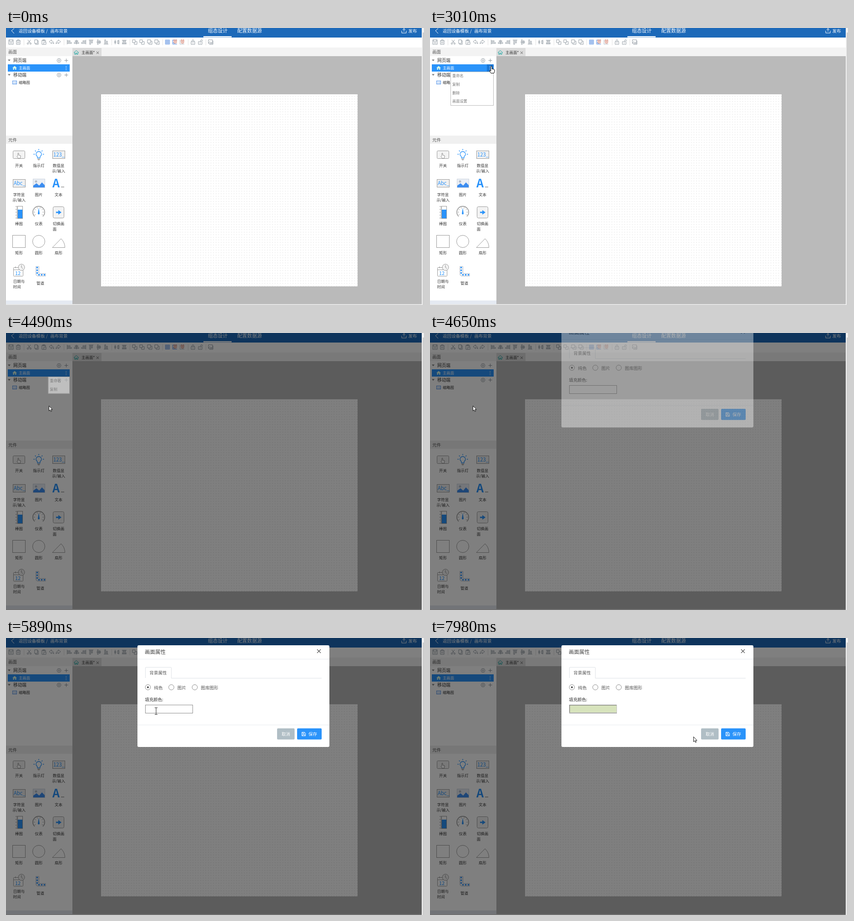
Animation, 919 px wide and 610 px high, one loop 8000 ms. Source, as an HTML page:

```html
<!DOCTYPE html>
<html lang="zh-CN">
<head>
<meta charset="utf-8">
<style>
html, body { margin: 0; width: 100%; height: 100%; overflow: hidden; background: #fff; }
svg { display: block; font-family: "Noto Sans CJK SC", "Noto Sans CJK", "Noto Sans CJK JP", sans-serif; }
</style>
</head>
<body>
<svg id="stage" width="919" height="610" viewBox="0 0 919 610"></svg>
<script>
const BLUE = '#2a93fa', GRAY = '#8a929b', TEXT = '#333';
const rect = (x, y, w, h, fill, extra = '') =>
  `<rect x="${x}" y="${y}" width="${w}" height="${h}" fill="${fill}" ${extra}/>`;
const box = (x, y, w, h, stroke, fill = 'none', r = 0) =>
  rect(x + .5, y + .5, w - 1, h - 1, fill, `stroke="${stroke}" rx="${r}"`);
const text = (x, y, size, str, fill = TEXT, extra = '') =>
  `<text x="${x}" y="${y + size * .37}" font-size="${size}" fill="${fill}" ${extra}>${str}</text>`;
const mid = (x, y, str) => text(x, y, 8.46, str, TEXT, 'text-anchor="middle"');
const path = (d, stroke = GRAY, fill = 'none', x = 0, y = 0, w = 1) =>
  `<path d="${d}" stroke="${stroke}" fill="${fill}" stroke-width="${w}" transform="translate(${x} ${y})"/>`;
const circle = (x, y, r, stroke, fill = 'none') =>
  `<circle cx="${x}" cy="${y}" r="${r}" stroke="${stroke}" fill="${fill}"/>`;
const group = (id, body, extra = '') => `<g id="${id}" ${extra}>${body}</g>`;

const HOME = 'M-5 0L0-4.5L5 0H3.5V4H1V1H-1V4H-3.5V0z';
const CROSS = 'M-2.5-2.5L2.5 2.5M2.5-2.5L-2.5 2.5';

function header() {
  return rect(0, 0, 914, 21, '#1c69b9') +
    path('M4-5L-2 0L4 6', '#fff', 'none', 14, 6) +
    text(28, 6, 9.6, '返回设备模板', '#fff', 'font-weight="500"') + text(88, 6, 9.6, '/', '#fff') +
    text(97.5, 6, 9.5, '画布背景', '#fff', 'font-weight="500"') +
    text(444, 6, 10.8, '组态设计', '#fff') + text(508.5, 6, 10.8, '配置数据源', '#fff') +
    rect(434, 18, 62, 2.5, '#fff') +
    path('M-5 0V5H5V0M0 2V-5M-3-2L0-5L3-2', '#fff', 'none', 875, 6) + text(884.5, 6, 9.6, '发布', '#fff');
}

function toolbar() {
  const ring = x => `M${x} 3.3a1.6 1.6 0 1 0 3.2 0a1.6 1.6 0 1 0-3.2 0`;
  const layers = 'M-5-5H1V1H-5zM-1 1V5H5V-1H1', stack = 'M-5-5H2V2H-5zM-2 2V5H5V-2H2';
  const magnet = 'M-2-4V1a3 3 0 0 0 6 0V-4H2V1a1 1 0 0 1-2 0V-4z';
  const lock = 'M-4-1H4V5H-4zM0 1V3';
  const icons = [
    [11, 'M-5-5H5V5H-5zM-3-5V-1H3V-5M-3 2H3'],
    [27, 'M-5-3H5M-2-3V-5H2V-3M-4-3V5H4V-3M-1.3-1V3M1.3-1V3'],
    [51, 'M-3-5L2 2M3-5L-2 2' + ring(-4.6) + ring(1.4)],
    [67, 'M-4-5H2V3H-4zM2-3H4V5H-2V3'],
    [83, 'M-4-4H4V0M0 5H-4V-4M-2-5H2V-3H-2zM0 0H5V5H0z'],
    [100, 'M-5-1L0-5V-2.5Q5-2 5 4Q3 1 0 1V3.5z'],
    [115, 'M5-1L0-5V-2.5Q-5-2-5 4Q-3 1 0 1V3.5z'],
    [139, 'M-4.5-5V5M-3-3H2V-1H-3zM-3 1H5V3H-3z'],
    [155, 'M0-5V5M-3-3H3V-1H-3zM-5 1H5V3H-5z'],
    [171, 'M4.5-5V5M-2-3H3V-1H-2zM-5 1H3V3H-5z'],
    [187, 'M-5-4.5H5M-3-3V5H-1V-3zM1-3V2H3V-3z'],
    [204, 'M-5 0H5M-3-5V5H-1V-5zM1-3V3H3V-3z'],
    [220, 'M-5 4.5H5M-3-5V3H-1V-5zM1-2V3H3V-2z'],
    [244, 'M-4-5V5M4-5V5M-5-2H-3V2H-5zM1-3H4V3H1z'],
    [260, 'M-5-4H5M-5 4H5M-3-3H3V-1H-3zM-4 1H4V3H-4z'],
    [283, layers], [299, layers], [316, stack], [332, stack],
    [411, lock + 'M-2-1V-3a2 2 0 0 1 4 0V-1'],
    [427, lock + 'M1-1V-3a2 2 0 0 1 4 0V-2'],
    [450, 'M-5-5H4V3H-5zM-5 2L-2-1L1 2L3 0M5-3V5H-3']
  ];
  const grid = 'M-4.5-5V5M-1.5-5V5M1.5-5V5M4.5-5V5M-5-4.5H5M-5-1.5H5M-5 1.5H5M-5 4.5H5';
  return icons.map(([x, d]) => path(d, GRAY, 'none', x, 31, .9)).join('') +
    [39, 127, 232, 272, 344, 400, 439].map(x => rect(x, 25, 1, 13, '#e2e2e2')).join('') +
    path(grid, '#5b8fe0', 'none', 355, 31) +
    path('M-4.5-5V5M-1.5-5V5M-5-4.5H5M-5 4.5H5M-5 1.5H0', '#5b8fe0', 'none', 371, 31) +
    path(magnet, '#d0705c', '#fff', 371, 30, .9) +
    path('M-4.5-5V5M-5 4.5H5', '#b5bcc6', 'none', 387, 31) + path(magnet, '#d0705c', 'none', 387, 30, .9);
}

function tree() {
  const section = (y, name) => path('M-3-1.5H3L0 2z', 'none', '#777', 7, y) + text(16, y, 9.7, name) +
    path('M-2.3-4H2.3L4.6 0L2.3 4H-2.3L-4.6 0z', GRAY, 'none', 116.5, y + .5, .9) +
    circle(116.5, y + .5, 1.6, GRAY) + path('M-4 0H4M0-4V4', GRAY, 'none', 132.5, y + .5);
  return rect(0, 43, 146, 19, '#f3f3f3') + text(5, 52.5, 9.6, '画面', '#555') +
    section(71, '网页端') + section(103, '移动端') +
    rect(4, 80, 136, 16, BLUE) + rect(125, 80, 15, 16, '#1a78d8', 'id="more"') +
    path(HOME, 'none', '#d6f7e8', 19, 88) + text(28, 88, 8.4, '主画面', '#fff') +
    [84, 87.5, 91].map(y => rect(131.5, y, 1.4, 1.4, '#fff')).join('') +
    box(14, 116, 10, 8, '#4a8ee8') + path('M16.5 119H18.5M16.5 121.5H18.5M20 119H22M20 121.5H22', '#4a8ee8') +
    text(28, 120, 8.3, '缩略图');
}

function palette() {
  const label = (x, y, ...lines) => lines.map((s, i) => mid(x, y + i * 11.5, s)).join('');
  const polar = (cx, cy, r0, r1, a) => {
    const c = Math.cos(a), s = Math.sin(a);
    return `M${cx + r0 * c} ${cy + r0 * s}L${cx + r1 * c} ${cy + r1 * s}`;
  };
  const ticks = (cx, cy, r0, r1, from, step, n) =>
    Array.from({ length: n }, (_, i) => polar(cx, cy, r0, r1, from + i * step)).join('');
  const field = (x, y, s) => box(x, y, 28, 18, '#999', '#f0f0f0') + text(x + 2, y + 9, 11.3, s, BLUE);
  const ruler = Array.from({ length: 9 }, (_, i) => `M${i % 2 ? 23 : 21} ${393 + i * 3.2}H25`).join('');
  const pipe = [526, 532, 538].map(y => rect(67, y, 3, 3, BLUE)).join('') +
    [71, 77, 83].map(x => rect(x, 542, 3, 3, BLUE)).join('');
  return rect(0, 237, 146, 18, '#f0f0f0') + text(5, 246, 9.6, '元件', '#555') +
    box(15, 270, 27, 18, '#999', '#f3f3f3', 2) +
    path('M26 281V276q1-1.5 2 0V280L32 281V284L31 287H27L24 283z', '#777', '#fff', 0, 0, .8) +
    label(28.5, 303, '开关') +
    path('M69 286V283Q66 281 66 278a6 6 0 0 1 12 0Q78 281 75 283V286z', BLUE, '#fff', 0, 0, 1.3) +
    path('M69 288.500H75M70 290.500H74', '#777') +
    path(ticks(72, 278, 9, 11.5, -Math.PI, Math.PI / 4, 5), BLUE, 'none', 0, 0, 1.4) + label(72, 303, '指示灯') +
    field(102, 270, '123_') + label(115.5, 303, '数值显', '示/输入') +
    field(15, 333, 'Abc_') + label(28.5, 367, '字符显', '示/输入') +
    box(59, 332, 27, 20, '#ccd3dd', '#e9eef5') + circle(66, 338, 2.5, 'none', '#b5bcc6') +
    path('M60 351V347L67 342L73 347L79 340L85 346V351z', 'none', '#3c8df0') + label(72, 367, '图片') +
    text(102, 342, 25, 'A', BLUE, 'font-weight="700"') + rect(121, 349.5, 7, 1.3, '#888') + label(115.5, 367, '文本') +
    path(ruler + 'M25.5 392V419', '#888') + box(25, 392, 12, 28, '#999') + rect(26, 400, 10, 19, BLUE) +
    label(28.5, 431, '棒图') +
    path('M63 415a13 13 0 1 1 18 0', '#999', 'none', 0, 0, 1.6) +
    path(ticks(72, 405.5, 8.5, 11, -Math.PI * 1.2, Math.PI * .2, 8), '#999') +
    path('M72 396L74 409Q72 412 70 409z', 'none', BLUE) + label(72, 431, '仪表') +
    box(103, 393, 25, 26, '#999', '#f3f3f3', 3) + path('M110 404.500H115V401L122 406L115 411V407.500H110z', 'none', BLUE) +
    label(115.5, 431, '切换画', '面&#12288;&#12288;') +
    box(14, 456, 29, 28, '#999') + label(28.5, 495, '矩形') +
    circle(72, 470, 13.5, '#999') + label(72, 495, '圆形') +
    path('M102 483.500L121 464Q129.500 472 129.500 483.500z', '#999') + label(115.5, 495, '扇形') +
    box(16, 527, 22, 20, '#999', '#fff', 1) + path('M16 532.500H38M21 525V529', '#999') +
    text(20, 540, 11, '12', BLUE) + circle(34, 527, 7, '#999', '#f3f3f3') + path('M34 522.500V527L37 530', '#888') +
    label(28.5, 558, '日期与', '时间&#12288;') +
    path('M65.500 525V541Q65.500 546.500 71 546.500H87V540.500H74Q72.500 540.500 72.500 538V525z', '#b9c4d2', '#e9eef5') +
    pipe + label(75.5, 562, '管道') +
    rect(0, 600, 146, 9, '#e5eaf2');
}

function workspace() {
  return rect(146, 43, 768, 19, '#f3f3f3') + rect(146, 44, 64, 18, '#dcdcdc') +
    path(HOME, '#17a5a0', 'none', 154.5, 54) + text(166, 54, 8.46, '主画面*') + path(CROSS, '#555', 'none', 201.5, 54.5) +
    rect(146, 62, 768, 546, '#bababa') + rect(209, 146, 564, 423, '#fff') + rect(209, 146, 564, 423, 'url(#dots)') +
    rect(0, 608, 914, 2, '#e6e6e6');
}

function menu() {
  const items = ['重命名', '复制', '删除', '画面设置'];
  return `<svg id="menu" y="96" overflow="hidden">` + rect(0, 0, 95, 75, '#fff') +
    rect(0, 0, 95, 19, '#dbe8fb', 'id="hover"') +
    items.map((s, i) => text(4, 9 + i * 18.8, 8.2, s, '#777')).join('') +
    `<rect id="frame" x=".5" y=".5" fill="none" stroke="#bbb"/></svg>`;
}

function modal() {
  const radio = (x, s) => circle(x, 108.5, 5.8, '#888', '#fff') + text(x + 13.3, 109, 9.6, s, '#555');
  return rect(289, 16, 422, 224, '#fff', 'rx="3"') +
    text(305, 31, 11.5, '画面属性', '#444') + path('M-4-4L4 4M4-4L-4 4', '#555', 'none', 688, 29, 1.2) +
    rect(289, 46, 422, 1, '#e9ecef') +
    path('M306.500 88V66Q306.500 64.500 308 64.500H362Q363.500 64.500 363.500 66V88.500H694', '#dee2e6') +
    text(315.5, 76, 9.5, '背景属性', '#555') +
    radio(312, '纯色') + circle(312, 108.5, 2, 'none', '#444') + radio(363.5, '图片') + radio(415, '图库图形') +
    text(305.5, 136, 9.4, '填充颜色:') + box(306, 147, 105, 19, '#8c8c8c', '#fff') +
    group('filled', rect(306, 147, 105, 18, '#d7e3bc') + path('M306.800 165V147.800H411', '#858585', 'none', 0, 0, 1.5) +
      path('M306 164.500H410.500V147', '#c4c4c4')) +
    rect(289, 191, 422, 1, '#e9ecef') +
    rect(596, 199, 38.5, 24.5, '#b0bec5', 'rx="2"') + text(606, 211.5, 9.3, '取消', '#fff') +
    rect(640, 199, 54, 24.5, BLUE, 'rx="2"') +
    path('M-4-4H2L4-2V4H-4zM-2-4V-1H1V-4M-2 4V1H2V4', '#fff', 'none', 654.5, 211.5) +
    text(665, 211.5, 9.5, '保存', '#fff', 'font-weight="500"');
}

function picker() {
  const theme = 'fff 000 eeece1 1f497d 4f81bd c0504d 9bbb59 8064a2 4bacc6 f79646';
  const tints = [
    'f2f2f2 7f7f7f ddd9c3 c6d9f0 dbe5f1 f2dcdb ebf1dd e5e0ec dbeef3 fdeada',
    'd8d8d8 595959 c4bd97 8db3e2 b8cce4 e5b9b7 d7e3bc ccc1d9 b7dde8 fbd5b5',
    'bfbfbf 3f3f3f 938953 548dd4 95b3d7 d99694 c3d69b b2a2c7 92cddc fac08f',
    'a5a5a5 262626 494429 17365d 366092 953734 76923c 5f497a 31859b e36c09',
    '7f7f7f 0c0c0c 1d1b10 0f243e 244061 632423 4f6128 3f3151 205867 974806'];
  const standard = 'c00000 f00 ffc000 ff0 92d050 00b050 00b0f0 0070c0 002060 7030a0';
  const row = (colors, y, h, border) => colors.split(' ').map((c, i) => {
    const x = 311 + i * 13.38;
    return rect(x, y, 11, h, '#' + c) + (border ? rect(x + .5, y + .5, 10, h - 1, 'none', 'stroke="#bbb" stroke-opacity=".7"') : '');
  }).join('');
  return box(306, 166, 141, 138, '#aaa', '#fff', 1) + text(313, 179, 9.3, '主题色') + row(theme, 189, 11, true) +
    tints.map((c, i) => row(c, 207 + i * 9.4, 9.5)).join('') +
    text(313, 265.5, 9.3, '标准色') + row(standard, 275.5, 11, true) +
    text(311, 295, 8.3, 'Web安全色', '#4a50e0') + text(355.5, 295, 8.3, '历史', '#4a50e0');
}

const cursors =
  group('arrow', path('M.5.500V11.500L3 9.200L4.800 13L6.500 12.200L4.800 8.600H8z', '#000', '#fff', 0, 0, .9)) +
  group('hand', path('M-1.300 9V1.200a1.300 1.300 0 0 1 2.600 0V6L5.500 7Q7 7.400 7 9V11.500L5.500 15.500H-1L-4 11Q-4.300 8.500-2.600 9.300L-1.300 11z', '#000', '#fff')) +
  group('beam', path('M-3-7.500H-.5L0-7L.5-7.500H3M0-7V7M-3 7.500H-.5L0 7L.5 7.500H3', '#222'));

const stage = document.getElementById('stage');
stage.innerHTML =
  `<defs><pattern id="dots" x="209" y="146" width="5.64" height="5.64" patternUnits="userSpaceOnUse">
    ${rect(4.2, 4.2, 1, 1, '#bdbdbd')}</pattern></defs>` +
  rect(0, 0, 919, 610, '#fff') + header() + toolbar() + tree() + palette() + workspace() +
  rect(914, 0, 5, 610, '#f1f1f1') + rect(916, 10, 3, 600, '#cfcfcf') +
  rect(0, 0, 914, 610, '#000', 'id="shade" opacity=".5"') + menu() +
  group('modal', modal()) + group('picker', picker()) + group('cursor', cursors);

const el = id => document.getElementById(id);
const show = (id, on) => el(id).setAttribute('display', on ? 'inline' : 'none');
const set = (id, attrs) => { for (const k in attrs) el(id).setAttribute(k, attrs[k]); };
const clamp = v => Math.max(0, Math.min(1, v));

// start, end, steps, target x, target y
const moves = [
  [430, 1210, 11, 454, 242], [1920, 2630, 10, 135, 84], [3470, 4170, 10, 94, 160],
  [5120, 5660, 8, 330, 175], [5737, 5890, 3, 330, 161],
  [6420, 6890, 7, 391, 207], [6960, 7130, 3, 397, 223], [7430, 7980, 8, 579, 217]
];
const stepped = (t, t0, t1, n) => clamp((Math.floor((t - t0) / (t1 - t0) * (n - 1) + .05) + 1) / n);

function pointer(t) {
  let x = 848, y = 585;
  for (const [t0, t1, n, tx, ty] of moves) {
    if (t < t0) break;
    const e = (1 - Math.cos(Math.PI * stepped(t, t0, t1, n))) / 2;
    x += (tx - x) * e;
    y += (ty - y) * e;
  }
  return [x, y];
}

function draw(t) {
  const [x, y] = pointer(t), dimmed = t >= 4490;
  const picking = t >= 6040 && t < 7430;
  const beam = dimmed && x > 306 && x < 411 && y > 147 && y < 166;
  const hand = !dimmed && x < 140 && y > 80 && y < 172;
  show('cursor', t >= 430);
  set('cursor', { transform: `translate(${x} ${y})` });
  show('hand', hand);
  show('beam', beam);
  show('arrow', !hand && !beam);
  show('more', hand && x > 125 && y < 96);

  const open = t < 2870 || t >= 4572 ? 0 : dimmed ? .5 : stepped(t, 2870, 3010, 3);
  const w = 95 * open, h = 75 * open;
  show('menu', open > 0);
  set('menu', { x: 140 - w, width: w, height: h, opacity: open });
  set('frame', { width: Math.max(0, w - 1), height: Math.max(0, h - 1) });
  show('hover', hand && y >= 96);
  set('hover', { y: Math.min(3, Math.floor((y - 96) / 18.8)) * 18.8 });

  const p = clamp(Math.floor((t - 4490) / 82 + .02) / 5);
  show('shade', dimmed);
  show('modal', p > 0);
  set('modal', { opacity: Math.min(1, p * 2), transform: `translate(0 ${-50 * (1 - p) ** 2})` });
  show('filled', t >= 7430);
  show('picker', picking);
}

const begin = performance.now();
function tick() {
  draw((performance.now() - begin) % 8000);
  requestAnimationFrame(tick);
}
tick();
</script>
</body>
</html>
```
